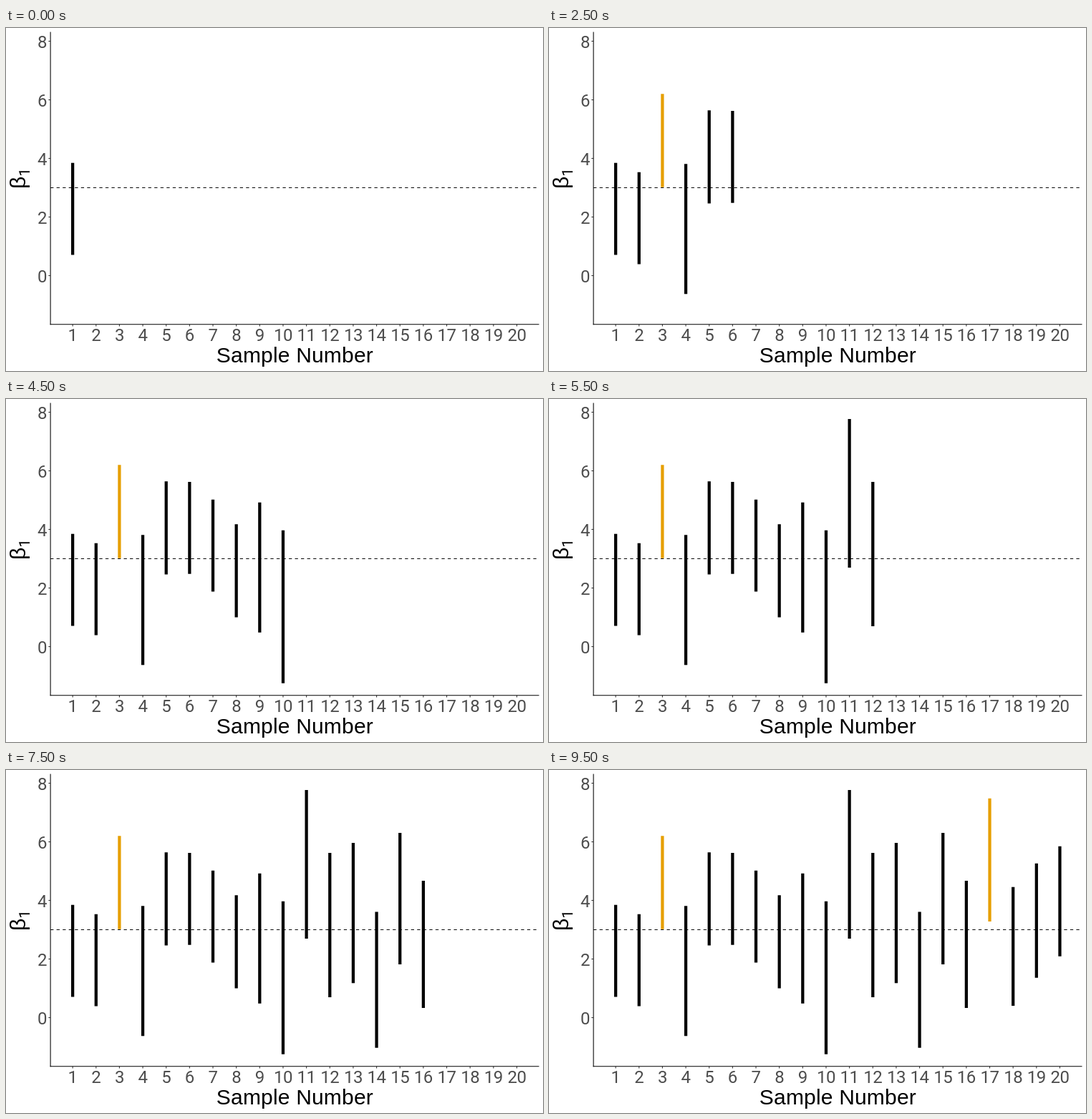
Write an HTML page that moves like this. It is 750 px wide and 480 px high and loops after 10000 ms.

```html
<!DOCTYPE html>
<html lang="en">
<head>
<meta charset="utf-8">
<title>Confidence intervals</title>
<style>
  html, body { margin: 0; width: 100%; height: 100%; overflow: hidden; background: #fff; }
  svg { display: block; width: 750px; height: 480px; }
  text { font-family: "Liberation Sans", Arial, sans-serif; font-size: 30px; }
  .label { font-family: Roboto, Arial, sans-serif; font-size: 24px; fill: #4d4d4d; letter-spacing: -0.45px; }
  .title { letter-spacing: 0.177px; }
  .sub { font-family: Roboto, Arial, sans-serif; font-size: 21px; }
  line { stroke: #000; stroke-width: 1.067; }
  .tick { stroke: #333; }
  .mean { stroke-dasharray: 4.268; }
  .bar { stroke-width: 4.268; }
  .miss { stroke: #e69f00; }
</style>
</head>
<body>
<svg viewBox="0 0 750 480">
  <g id="bars"></g>
  <line class="mean" x1="62.1" y1="223.5" x2="744.5" y2="223.5"/>
  <g id="axes">
    <line x1="62.1" y1="5.5" x2="62.1" y2="415.3"/>
    <line x1="61.6" y1="414.8" x2="744.5" y2="414.8"/>
  </g>
  <text class="title" x="403.4" y="468" text-anchor="middle">Sample Number</text>
  <g transform="translate(26.5 225) rotate(-90)">
    <text>β</text>
    <text class="sub" x="17.3" y="6.5">1</text>
  </g>
</svg>
<script>
  const STEP = 500, LOOP = 10000, BETA = 3;
  const estimates = [
    2.28, 1.96, 4.61, 1.59, 4.05, 4.05, 3.45, 2.59, 2.7, 1.36,
    5.23, 3.16, 3.57, 1.29, 4.06, 2.5, 5.38, 2.43, 3.31, 3.97
  ];
  const bars = document.getElementById("bars");
  const axes = document.getElementById("axes");

  const xAt = i => 93.12 + 32.65 * i;
  const yAt = v => 346.5 - 41 * v;

  // Narrow at first with a wide one every fifth, then wide and shrinking
  function margin(i) {
    if (i >= 9) return 2.61 - 0.073 * (i - 9);
    const wave = Math.cos((i - 3) * Math.PI * 2 / 5);
    return 1.57 + 0.65 * Math.max(0, wave) ** 3;
  }

  function add(parent, tag, attrs, text = "") {
    const el = document.createElementNS("http://www.w3.org/2000/svg", tag);
    for (const key in attrs) el.setAttribute(key, attrs[key]);
    el.textContent = text;
    return parent.appendChild(el);
  }

  const items = estimates.map((mid, i) => {
    const x = xAt(i), m = margin(i);
    add(axes, "line", { class: "tick", x1: x, x2: x, y1: 414.8, y2: 417.5 });
    add(axes, "text", { class: "label", x, y: 438, "text-anchor": "middle" }, i + 1);
    const hit = Math.abs(mid - BETA) < m;
    return add(bars, "line", {
      class: hit ? "bar" : "bar miss", x1: x, x2: x, y1: yAt(mid + m), y2: yAt(mid - m)
    });
  });

  for (let v = 0; v <= 8; v += 2) {
    const y = yAt(v);
    add(axes, "line", { class: "tick", x1: 59.35, x2: 62.1, y1: y, y2: y });
    add(axes, "text", { class: "label", x: 57, y: y + 9, "text-anchor": "end" }, v);
  }

  function draw(now) {
    const t = now % LOOP;
    items.forEach((el, i) => {
      el.style.visibility = t >= i * STEP ? "visible" : "hidden";
    });
    requestAnimationFrame(draw);
  }
  draw(0);
</script>
</body>
</html>
```
